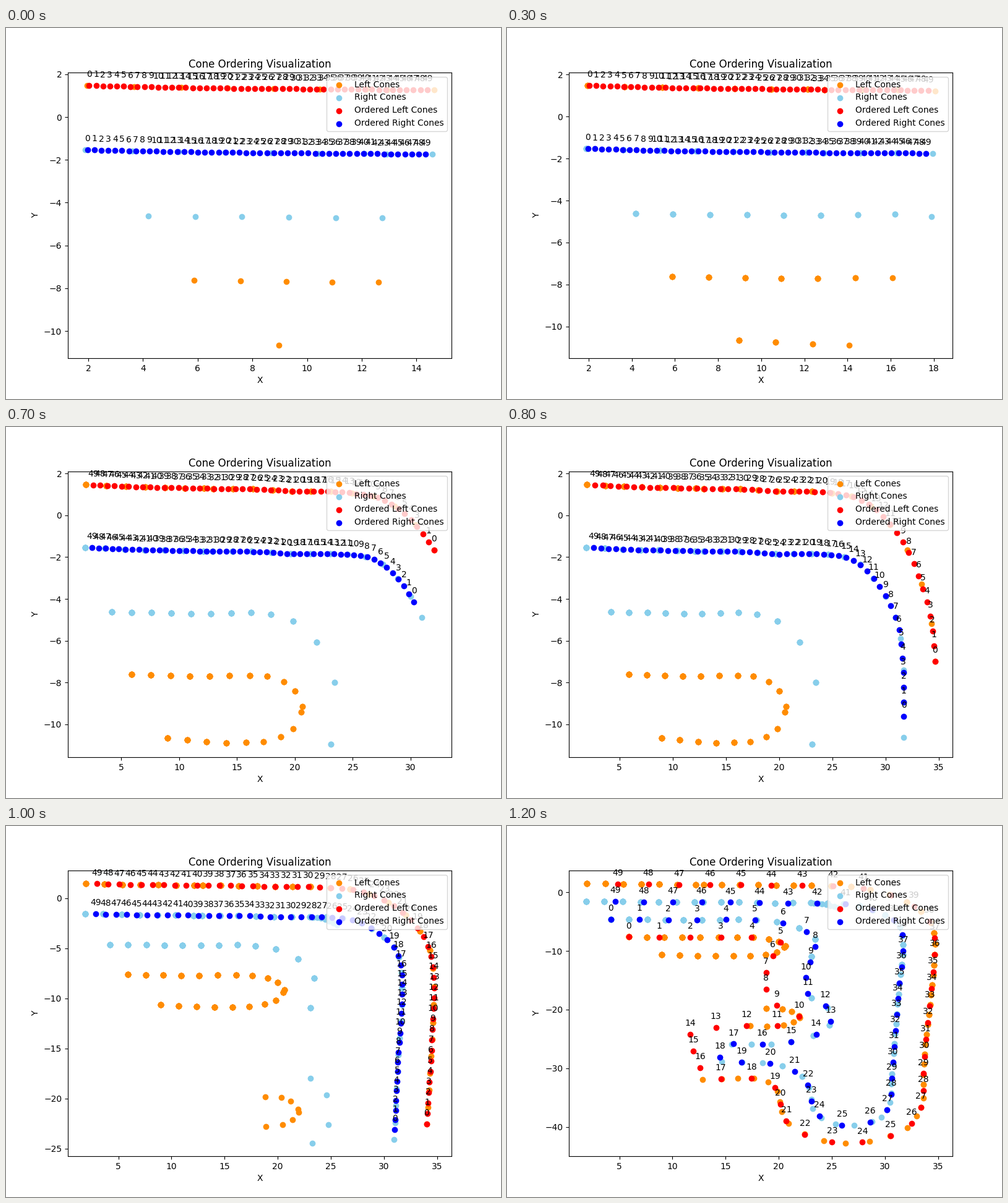
Animation of 800 by 600 pixels, one loop 1300 ms. Source, as a matplotlib script:

```python
import numpy as np
import matplotlib.pyplot as plt
from matplotlib.animation import FuncAnimation

FRAMES, STEP_MS, SAMPLES = 13, 100, 50
LAST = FRAMES - 1
RANGE = 15.6   # how far cones are sensed
FLIP = 7       # from this step on the order starts at the far end
GHOST = 9      # stray detections appear here


def spans(keys, n=40):
    """Smooth curve through the keys, one dense piece per pair of keys."""
    p = np.asarray(keys, float)
    s = np.r_[0, np.cumsum(np.hypot(*np.diff(p, axis=0).T))]
    m = np.gradient(p, s, axis=0)
    u = np.linspace(0, 1, n)[:, None]
    out = []
    for i, h in enumerate(np.diff(s)):
        out.append((2*u**3 - 3*u**2 + 1) * p[i] + (3*u**2 - 2*u**3) * p[i + 1]
                   + h * ((u**3 - 2*u**2 + u) * m[i] + (u**3 - u**2) * m[i + 1]))
    return out


def arc(line):
    return np.r_[0, np.cumsum(np.hypot(*np.diff(line, axis=0).T))]


def walk(line, t):
    """Points at arc lengths t."""
    s = arc(line)
    return np.column_stack([np.interp(t, s, c) for c in line.T])


def cones(keys, gap=1.76):
    """Cones on every key and evenly in between, about one gap apart."""
    out = [np.array(keys[:1])]
    for span in spans(keys):
        size = arc(span)[-1]
        n = max(1, round(size / gap))
        out.append(walk(span, np.linspace(0, size, n + 1)[1:]))
    return np.vstack(out)


left_lane = cones([
    (1.95, 1.475), (5.4, 1.38), (12.16, 1.29), (12.94, 1.28), (18.06, 1.22),
    (19.75, 1.15), (23.09, 1.14), (28.6, .45), (32.03, -1.65), (34.3, -5.17),
    (34.72, -8.83), (34.6, -12.4), (33.6, -32.7), (33.6, -35.05), (33, -38.1),
    (32.1, -40.1), (28.54, -42.4), (26.27, -42.74), (22.43, -41.2),
    (20.92, -39.4), (20.28, -37.4), (19.87, -33.9), (19, -32.3),
    (14.63, -31.8), (12.83, -31.9)])
left_top = cones([
    (5.88, -7.62), (12.61, -7.71), (16.1, -7.68), (19.04, -7.95),
    (20.02, -8.42), (20.63, -9.14), (20.53, -9.41)])
left_back = cones([
    (8.98, -10.66), (15.77, -10.86), (18.8, -10.6), (19.83, -10.2)])
left_loop = cones([
    (18.82, -19.83), (20.33, -19.9), (21.2, -20.3), (21.9, -21.1),
    (22, -21.4), (21.4, -22.1), (20.45, -22.6), (17.3, -22.76)])

right_lane = cones([
    (1.89, -1.53), (5.3, -1.62), (12.1, -1.71), (12.9, -1.72), (17.96, -1.77),
    (19.65, -1.85), (23.04, -1.84), (27.6, -2.35), (30, -3.87), (30.95, -4.9),
    (31.4, -5.9), (31.7, -8.95), (31.36, -15.63), (30.6, -32.6),
    (30.46, -35.8), (29.65, -38.3), (28.8, -39.05), (25.35, -39.5),
    (23.2, -36.84), (23.07, -35.26), (22.2, -31.4), (20.33, -29.6),
    (14.63, -28.84)])
right_inner = np.vstack([
    cones([(4.19, -4.62), (12.76, -4.72), (17.9, -4.75), (19.84, -5.07),
           (21.9, -6.07), (23.42, -7.99)]),
    [(23.09, -10.95)],
    cones([(23.07, -17.96), (24.58, -19.67), (24.76, -22.6), (23.25, -24.47),
           (21.15, -25.5), (15.57, -25.9)], gap=2.1)])
ghosts = cones([(23.3, -1.93), (24.1, -1.98), (25.57, -2.65)], gap=.4)

LEFT = np.vstack([left_lane, left_top, left_back, left_loop])
RIGHT = np.vstack([right_lane, right_inner])

# Full courses, used once the whole track is known
left_course = np.vstack([
    left_lane[:-1],
    [(13.9, -31.6), (12.4, -29.3), (11.9, -26.4), (11.8, -23.8),
     (14.6, -22.95)],
    left_loop[:1:-1],
    [(19.8, -19.2), (18.8, -16.5), (18.8, -13.7)],
    left_back[-1:], left_top[::-1]])
right_course = np.vstack([right_lane, right_inner[::-1]])


def sensor(k):
    t = [0, 3, 5, 7, 9, 11]
    return np.array([np.interp(k, t, [-.8, 3.2, 7.75, 16.7, 25, 30]),
                     np.interp(k, t, [0, 0, 0, 0, -1.6, -18])])


def near(pts, k):
    return (np.hypot(*(pts - sensor(k)).T) < RANGE) | (k == LAST)


def seen(pts, k):
    """All detections up to step k, repeats included."""
    return np.vstack([pts[near(pts, i)] for i in range(k + 1)])


def ordered(lane, course, k, lag=0):
    """Evenly spaced points on the part of the lane known without a gap."""
    if k == LAST:
        keys, lag = course, 0
    else:
        known = np.any([near(lane, i) for i in range(k + 1)], axis=0)
        keys = lane[:np.argmin(known)]
    line = np.vstack(spans(keys))
    end = arc(line)[-1]
    if k < FLIP:
        t = np.linspace(.08, end, SAMPLES, endpoint=False)
    else:
        t = np.linspace(end - lag, 0, SAMPLES, endpoint=False)
    return walk(line, t)


fig, ax = plt.subplots(figsize=(8, 6), dpi=100)


def update(k):
    ax.clear()
    right = seen(RIGHT, k)
    if k >= GHOST:
        right = np.vstack([right, ghosts])
    paths = (ordered(left_lane, left_course, k),
             ordered(right_lane, right_course, k, lag=1))
    layers = [
        (seen(LEFT, k), "darkorange", "Left Cones"),
        (right, "skyblue", "Right Cones"),
        (paths[0], "red", "Ordered Left Cones"),
        (paths[1], "blue", "Ordered Right Cones"),
    ]
    for pts, color, label in layers:
        ax.scatter(*pts.T, color=color, label=label)
    for path in paths:
        for i, p in enumerate(path):
            ax.annotate(str(i), p, xytext=(0, 10),
                        textcoords="offset points", ha="center")
    ax.set_title("Cone Ordering Visualization")
    ax.set_xlabel("X")
    ax.set_ylabel("Y")
    ax.legend(loc="upper right")


anim = FuncAnimation(fig, update, frames=FRAMES, interval=STEP_MS,
                     repeat=True, repeat_delay=0)
plt.show()
```
